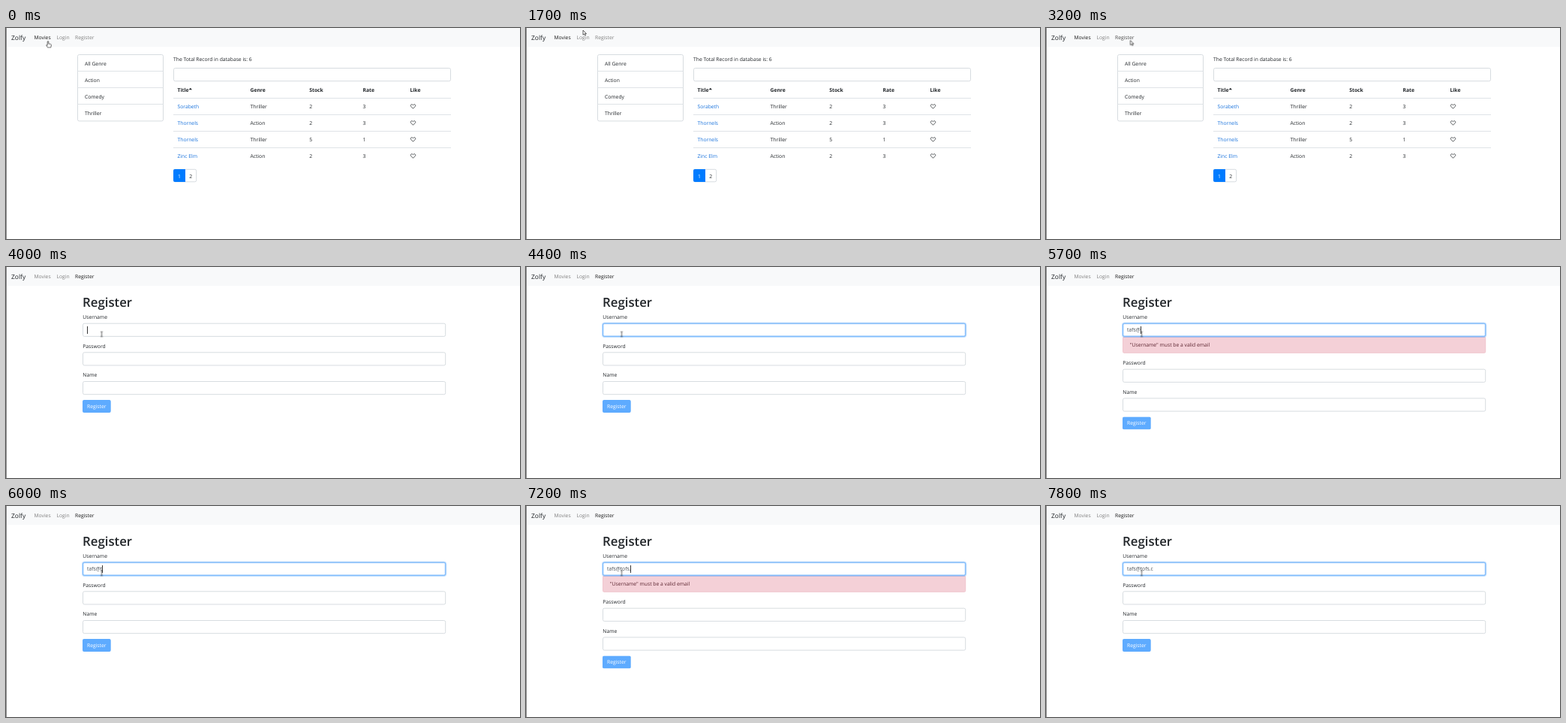
An HTML page that plays this animation: 685 by 281 pixels, repeating every 8 s.

```html
<!DOCTYPE html>
<html lang="en">
<head>
<meta charset="utf-8">
<title>Register form</title>
<style>
  html, body { margin: 0; width: 100%; height: 100%; overflow: hidden; background: #fff; }
  body { position: relative; font: 6.75px "Open Sans", "Noto Sans", sans-serif; }
  svg { position: absolute; left: 0; top: 0; display: block; }
  text { fill: #212529; text-rendering: geometricPrecision; white-space: pre; }
  .brand { font-size: 8.45px; }
  .title { font-size: 16.8px; font-weight: 600; }
  .head { font-weight: 700; }
  .link { fill: #1a73dc; }
  .light { fill: #fff; }
  .muted { fill: #808080; }
  .alert { fill: #f4d0d7; stroke: #f1c6ce; }
  .alert + text { fill: #5c2530; }
  .box { fill: #fff; stroke: #d3d8dd; stroke-width: .9; }
  .line { fill: none; stroke: #dfe3e7; }
  .heart { fill: none; stroke: #2b2f33; stroke-width: .8; }
  .ring { fill: none; stroke: #007bff; stroke-opacity: .25; stroke-width: 2.6; }
  .ring + rect { fill: none; stroke: #80bdff; }
  .pointer { fill: #fff; stroke: #222; stroke-width: .7; stroke-linejoin: round; }

  /* Everything shares one 8 s clock and mostly changes in hard steps. */
  .list, .form, .error, .below, .movies, .register, .cursor, .hand, .arrow, .beam,
  .field::before, .field::after { animation: 8s step-end infinite; }

  .list { animation-name: list; }
  .form { animation-name: form; }
  @keyframes list { 0% { opacity: 1 } 41.25%, to { opacity: 0 } }
  @keyframes form { 0% { opacity: 0 } 41.25%, to { opacity: 1 } }

  .movies { animation-name: movies; }
  .register { animation-name: register; }
  @keyframes movies { 0% { fill: #191919 } 41.25%, to { fill: #808080 } }
  @keyframes register { 0% { fill: #808080 } 23.75% { fill: #4a4a4a } 41.25%, to { fill: #191919 } }

  .focus { animation: focus 8s linear infinite; }
  @keyframes focus { 0%, 50% { opacity: 0 } 52%, to { opacity: 1 } }

  .error { animation-name: error; }
  .below { animation-name: below; }
  @keyframes error {
    0%, 75%, 92.5%, to { opacity: 0 }
    60%, 90% { opacity: 1 }
  }
  @keyframes below {
    0%, 75%, 92.5%, to { transform: none }
    60%, 90% { transform: translateY(22.4px) }
  }

  .field { position: absolute; left: 108px; top: 79px; line-height: 10px; color: #495057; white-space: pre; }
  .field::before { content: ""; animation-name: type; }
  .field::after {
    content: ""; position: absolute; top: 0; width: 1px; height: 9.5px;
    background: #333; animation-name: blink;
  }
  @keyframes type {
    0% { content: "" }
    60% { content: "t" }
    61.25% { content: "ta" }
    62.5% { content: "taf" }
    63.75% { content: "tafs" }
    71.25% { content: "tafs@" }
    75% { content: "tafs@t" }
    76.25% { content: "tafs@to" }
    78.75% { content: "tafs@tofs" }
    90% { content: "tafs@tofs." }
    92.5%, to { content: "tafs@tofs.c" }
  }
  @keyframes blink {
    0%, 55%, 67.5%, 83.75%, 97.5%, to { opacity: 0 }
    50%, 60%, 71.25%, 87.5% { opacity: 1 }
  }

  .cursor { animation-name: move; }
  .hand { animation-name: hand; }
  .arrow { animation-name: arrow; }
  .beam { animation-name: beam; }
  @keyframes move {
    0% { transform: translate(56px, 17.4px) }
    17.5% { transform: translate(56.5px, 17.6px) }
    21.25% { transform: translate(76px, 3px) }
    22.5% { transform: translate(98px, 8px) }
    23.75% { transform: translate(112.4px, 16.5px) }
    45% { transform: translate(114px, 24px) }
    46.25% { transform: translate(118px, 45px) }
    47.5% { transform: translate(123px, 70px) }
    48.75%, to { transform: translate(127.5px, 89.5px) }
  }
  @keyframes hand { 0%, 23.75% { opacity: 1 } 21.25%, 40%, to { opacity: 0 } }
  @keyframes arrow { 0%, 23.75%, 48.75%, to { opacity: 0 } 21.25%, 40% { opacity: 1 } }
  @keyframes beam { 0% { opacity: 0 } 48.75%, to { opacity: 1 } }
</style>
</head>
<body>
<svg width="685" height="281" viewBox="0 0 685 281">
  <defs>
    <path id="heart" class="heart" d="M542.5 107.3 L539.7 104.4 C538.3 102.6 540.8 100.5 542.5 102.7 C544.2 100.5 546.7 102.6 545.3 104.4Z"/>
    <rect id="input" class="box" x="102.5" y="75.2" width="483.2" height="17.2" rx="2"/>
  </defs>

  <rect width="685" height="25" fill="#f8f9fa"/>
  <rect width="1" height="281" fill="#8c8c8c"/>
  <text class="brand" x="7" y="16">Zolfy</text>
  <text class="movies" x="37.5" y="15.2">Movies</text>
  <text class="muted" x="67.5" y="15.2">Login</text>
  <text class="register" x="92" y="15.2">Register</text>

  <g class="list">
    <rect class="box" x="95.5" y="35.5" width="114" height="88.4" rx="2"/>
    <path class="line" d="M95.5 57.5h114M95.5 79.5h114M95.5 101.5h114"/>
    <text x="105" y="49.6">All Genre</text>
    <text x="105" y="71.7">Action</text>
    <text x="105" y="93.8">Comedy</text>
    <text x="105" y="115.9">Thriller</text>

    <text x="223" y="44">The Total Record in database is: 6</text>
    <rect class="box" x="223.5" y="53.5" width="369" height="17.2" rx="2"/>

    <g class="head">
      <text x="228.5" y="84.8">Title</text>
      <text x="325.5" y="84.8">Genre</text>
      <text x="404.3" y="84.8">Stock</text>
      <text x="475.5" y="84.8">Rate</text>
      <text x="538.5" y="84.8">Like</text>
    </g>
    <path d="M243.6 82.3l2.2-2.5 2.2 2.5z" fill="#212529"/>
    <path class="line" d="M223 93.5h370M223 115.5h370M223 137.5h370M223 159.5h370"/>

    <g>
      <text class="link" x="228.5" y="107">Sorabeth</text><text x="325.5" y="107">Thriller</text>
      <text x="404.3" y="107">2</text><text x="475.5" y="107">3</text><use href="#heart"/>
    </g>
    <g transform="translate(0 22)">
      <text class="link" x="228.5" y="107">Thornels</text><text x="325.5" y="107">Action</text>
      <text x="404.3" y="107">2</text><text x="475.5" y="107">3</text><use href="#heart"/>
    </g>
    <g transform="translate(0 44)">
      <text class="link" x="228.5" y="107">Thornels</text><text x="325.5" y="107">Thriller</text>
      <text x="404.3" y="107">5</text><text x="475.5" y="107">1</text><use href="#heart"/>
    </g>
    <g transform="translate(0 66)">
      <text class="link" x="228.5" y="107">Zinc Elm</text><text x="325.5" y="107">Action</text>
      <text x="404.3" y="107">2</text><text x="475.5" y="107">3</text><use href="#heart"/>
    </g>

    <rect class="box" x="223.5" y="188.3" width="30.2" height="16.5" rx="2"/>
    <path d="M239 188v17h-14a2 2 0 0 1-2-2v-13a2 2 0 0 1 2-2z" fill="#007bff"/>
    <text class="light" x="229" y="199.6">1</text>
    <text x="244.2" y="199.6">2</text>
  </g>

  <g class="form">
    <text class="title" x="102" y="53.2">Register</text>
    <text x="102.3" y="69">Username</text>
    <use href="#input"/>
    <g class="error">
      <rect class="alert" x="102.5" y="93" width="483.2" height="21.3" rx="1.5"/>
      <text x="111.8" y="106.4">"Username" must be a valid email</text>
    </g>
    <g class="focus">
      <rect class="ring" x="102.3" y="75" width="483.6" height="17.6" rx="2.4"/>
      <rect x="102.5" y="75.2" width="483.2" height="17.2" rx="2"/>
    </g>
    <g class="below">
      <text x="102.3" y="107.8">Password</text>
      <use href="#input" y="38.6"/>
      <text x="102.3" y="146.4">Name</text>
      <use href="#input" y="77.3"/>
      <rect x="102" y="177" width="37.7" height="17" rx="2" fill="#5eabff"/>
      <text class="light" x="108" y="188">Register</text>
    </g>
  </g>
</svg>

<div class="field"></div>

<svg width="685" height="281" viewBox="0 0 685 281">
  <g class="cursor">
    <path class="hand pointer" d="M-.8 .6Q0-.3 .8 .6V3.6L3.6 4.2Q4.6 4.5 4.4 5.6L3.7 8.6H-.4L-2.3 5.6Q-2.2 4.5-.8 5.5Z"/>
    <path class="arrow pointer" d="M0 0V6.2L1.5 4.9 2.6 7 3.6 6.5 2.6 4.5H4.5Z"/>
    <path class="beam" d="M-1.4-3.2H-.4L0-2.8 .4-3.2H1.4M0-2.8V2.8M-1.4 3.2H-.4L0 2.8 .4 3.2H1.4" fill="none" stroke="#333" stroke-width=".8"/>
  </g>
</svg>
</body>
</html>
```
